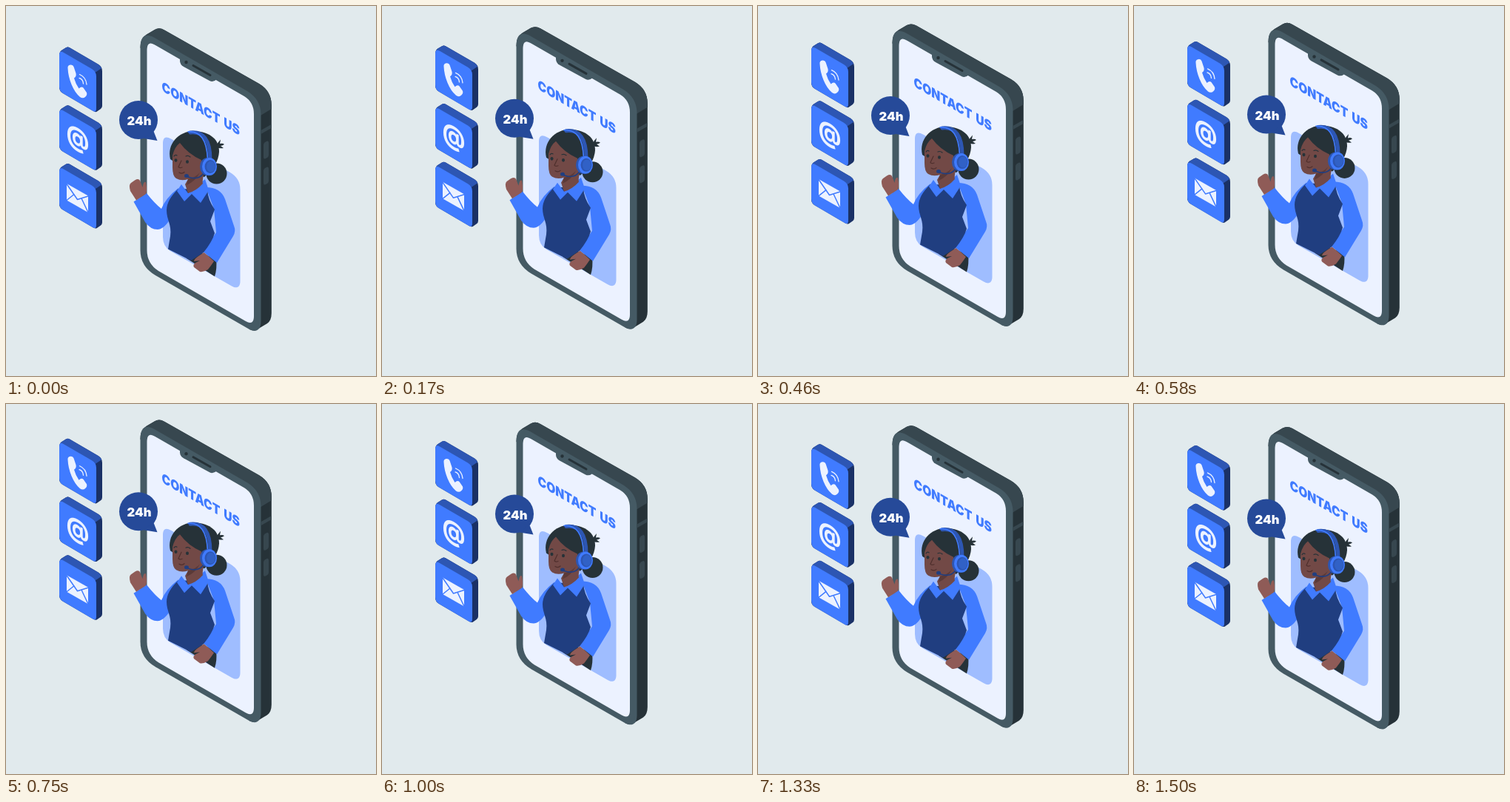
Recreate the animation shown at these times as an HTML page. Size 500 by 500 pixels, loop 1540 ms.

```html
<!DOCTYPE html>
<html lang="en">
<head>
<meta charset="utf-8">
<title>Contact us</title>
<style>
  html, body { margin: 0; width: 100%; height: 100%; overflow: hidden; background: #e1eaed; }
  svg { display: block; width: 100vw; height: 100vh; }
  text { font-family: Inter, sans-serif; font-weight: 900; }
  .blue { fill: #407bff; }
  .mid { fill: #2d56b3; }
  .navy { fill: #203e80; }
  .deep { fill: #1a3166; }
  .pale { fill: #ecf2ff; }
  .ink { fill: #263238; }
  .slate { fill: #37474f; }
  .frame { fill: #455a64; }
  .skin { fill: #724946; }
  .palm { fill: #8f5b57; }
  .line { fill: none; stroke-linecap: round; stroke-linejoin: round; }
</style>
</head>
<body>
<svg viewBox="0 0 500 500">
  <defs>
    <g id="tile">
      <path class="deep" d="M72 68Q72 62 75 60L81 56.3Q83.500 54.800 86 56.300L125 79Q130 82 130 88V135Q130 137.500 128 139L123 142.500Q121 144 118 142L77 118Q72 115 72 110Z"/>
      <path class="mid" d="M72.500 64Q73 61.300 75 60L81 56.300Q83.500 54.800 86 56.300L125 79Q128 81 129.200 84L121 89.500L112 90Z"/>
      <path class="blue" d="M72 67C72 61.500 74 60.800 78 63L116 85Q122 88.500 122 95V138C122 143.500 120 143.500 116.500 141.300L77 118Q72 115 72 109Z"/>
    </g>
  </defs>

  <g id="scene">
    <!-- phone -->
    <path class="ink" d="M181.500 56Q181.500 44 190 38.500L201 32Q207 28.500 214 32.500L342 105Q358.800 115 358.800 134V415Q358.800 425 353 429L340 436.800Q335 440 329 437Z"/>
    <path class="slate" d="M182 50Q184 42 190 38.500L201 32Q207 28.500 214 32.500L342 105Q358.800 115 358.800 134V139L344 148L300 118Z"/>
    <path class="frame" d="M181.500 56C181.500 41 188 36 200 42.500L326 115Q344 126 344.500 146V426C344.500 438 338 441.500 329 437L202 364Q181.500 352 181.500 330Z"/>
    <path class="pale" d="M190.500 61C190.500 50 194 48 202 53L322 122Q335 130 335 146V419C335 428 331 430 324 426L206 358Q190.500 348 190.500 330Z"/>
    <path class="frame" d="M235 68V74Q235 79 240 82L275 101Q280 103.500 285 99L281 93Z"/>
    <path class="line" stroke="#263238" stroke-width="3" d="M253 80.500L276 93.500"/>
    <circle class="ink" cx="243.500" cy="76" r="2.200"/>
    <path class="slate" d="M344.500 168L358.500 160V165L344.500 173ZM348 188Q348 185 351 183.500L353 182.500Q355 182 355 185V201Q355 204 352 205.500L350 206.500Q348 207 348 204ZM348 223Q348 220 351 218.500L353 217.500Q355 217 355 220V236Q355 239 352 240.500L350 241.500Q348 242 348 239Z"/>
    <text class="blue" transform="matrix(.866 .5 0 1 210.500 114.500)" font-size="18" word-spacing="2">CONTACT US</text>
    <path fill="#9fbdff" d="M212 186C212 177 216 175.500 223 179.500L303 225Q316.500 233 316.500 248V372C316.500 380 312 382.500 305 378.500L222 331Q212 325 212 312Z"/>

    <!-- body -->
    <path class="ink" d="M244 341L262 333L284 342Q285.500 355 282 365.500Z"/>
    <path class="blue" d="M172.500 264.500L190 253Q201 267 210 274Q216 259 233 246L228 276Q217 301 205 302Q195 302 188 292Z"/>
    <path class="blue" d="M270 245Q290 245 296 261L308 297Q311 304 307 311L285 347L266.500 332L284 306L281 274Z"/>
    <path class="navy" d="M233 247Q217 262 217 276C217 289 224 295 222 311L219 328.500L250 344L267 333Q279 318 282 307L276 291L282 275Q273 262 272 248Z"/>
    <path class="palm" d="M267.500 333Q274 338 281 345Q277 351 273 356Q267 360 262 359L254 353Q252 350 256 347L262 344L254 345Q254 342 260 338Z"/>
    <path class="palm" d="M176 262.500L168 250Q165.500 241 169 239L174 235.500Q180 232 181.500 237L184.500 245Q186 236 189 238L190 245Q190.500 250 189 254Z"/>
    <path class="blue" d="M237 241L246 253L269 234L274 249L263 266L251 254L241 264L231 250Z"/>

    <!-- head -->
    <circle class="ink" cx="284.500" cy="226.500" r="14"/>
    <path class="ink" d="M284 190Q286 184 290 180.500L289 186Q293 185 295 187Q292 189 290 189L294 192Q288 193 285 191Z"/>
    <path class="ink" d="M222 207C217 187 233 169 254 169C277 170 288 181 288 197Q287 215 268 231L250 226Z"/>
    <path class="skin" d="M225 202Q228 190 235 185Q246 200 264 208L267 228Q265 238 266 240Q257 250 246 253L242 241L246 234Q237 237 230 233Q225 230 225 218Z"/>
    <path fill="#5b3a38" d="M246 234Q256 232 262 225Q256 237 244 242Z"/>
    <ellipse class="ink" cx="229.500" cy="208.500" rx="2" ry="2.300"/>
    <ellipse class="ink" cx="245" cy="210.500" rx="2" ry="2.300"/>
    <path class="line" stroke="#263238" stroke-width="1.200" d="M227 203Q229 200.500 231 202M243 203Q246 201.500 249 204"/>
    <path class="line" stroke="#4f2f2d" stroke-width="1.200" d="M237 209L233 217.500Q235 219.500 238 218M234 225Q238 227.500 241 224.500"/>

    <!-- headset -->
    <path class="line" stroke="#2d56b3" stroke-width="5" d="M249 171Q276 168 276 208"/>
    <path class="line" stroke="#407bff" stroke-width="1.700" d="M246 170Q271 168 272.500 207"/>
    <path class="line" stroke="#203e80" stroke-width="1.700" d="M267 226Q260 236 246 231"/>
    <ellipse class="navy" cx="244" cy="229.500" rx="3" ry="2.500"/>
    <ellipse class="mid" cx="272" cy="217" rx="10" ry="12"/>
    <ellipse class="blue" cx="275" cy="217" rx="10" ry="12"/>
    <ellipse class="mid" cx="276" cy="217" rx="7.500" ry="9"/>
    <ellipse fill="#3161c6" cx="277" cy="217" rx="6" ry="7.500"/>

    <!-- bubble -->
    <g fill="#264a99">
      <circle cx="179" cy="154" r="26"/>
      <path d="M186 179L204.500 182L199 168Z"/>
    </g>
    <text x="180" y="161.200" font-size="16.600" text-anchor="middle" fill="#fff">24h</text>

    <!-- contact tiles -->
    <use href="#tile"/>
    <use href="#tile" y="78.700"/>
    <use href="#tile" y="157.400"/>
    <path class="pale" d="M83.500 84Q83 80 87 79.500Q90.500 79 91.500 82L94.500 91Q95.500 95 92 97.500Q94 105 98.500 111.500Q102 108 104.500 110.500L109 117Q110 120 107.500 122.500Q104 126 100 123Q93 117 88.500 106Q84 95 83.500 84Z"/>
    <path class="line" stroke="#ecf2ff" stroke-width="1.300" d="M99 97.500Q104 99 104.500 105M99.500 92.500Q108 96 109 106"/>
    <text class="pale" transform="matrix(.866 .5 0 1 97 189.500)" font-size="34" text-anchor="middle" style="font-weight:800">@</text>
    <path class="pale" d="M82 240L111 256.500V279L82 262.500Z"/>
    <path class="line" stroke="#407bff" stroke-width="1.500" d="M82 240.500L96.500 261.500L111 257M82 262.500L92 254.500M111 279L102 260"/>
  </g>
</svg>
<script>
  const LOOP = 1540, STEPS = 37, RISE = 10, LEAD = 1.4;
  const scene = document.getElementById('scene');
  const start = performance.now();

  // Linear float up and back down, stepped at about 24 fps
  function draw(now) {
    const time = Math.max(0, now - start) % LOOP;
    const step = Math.floor((time + 4) / LOOP * STEPS) % STEPS;
    const phase = (step + LEAD) / STEPS % 1;
    const lift = RISE * (1 - Math.abs(1 - 2 * phase));
    scene.setAttribute('transform', `translate(0 ${(0.75 - lift).toFixed(2)})`);
    requestAnimationFrame(draw);
  }
  draw(start);
</script>
</body>
</html>
```
